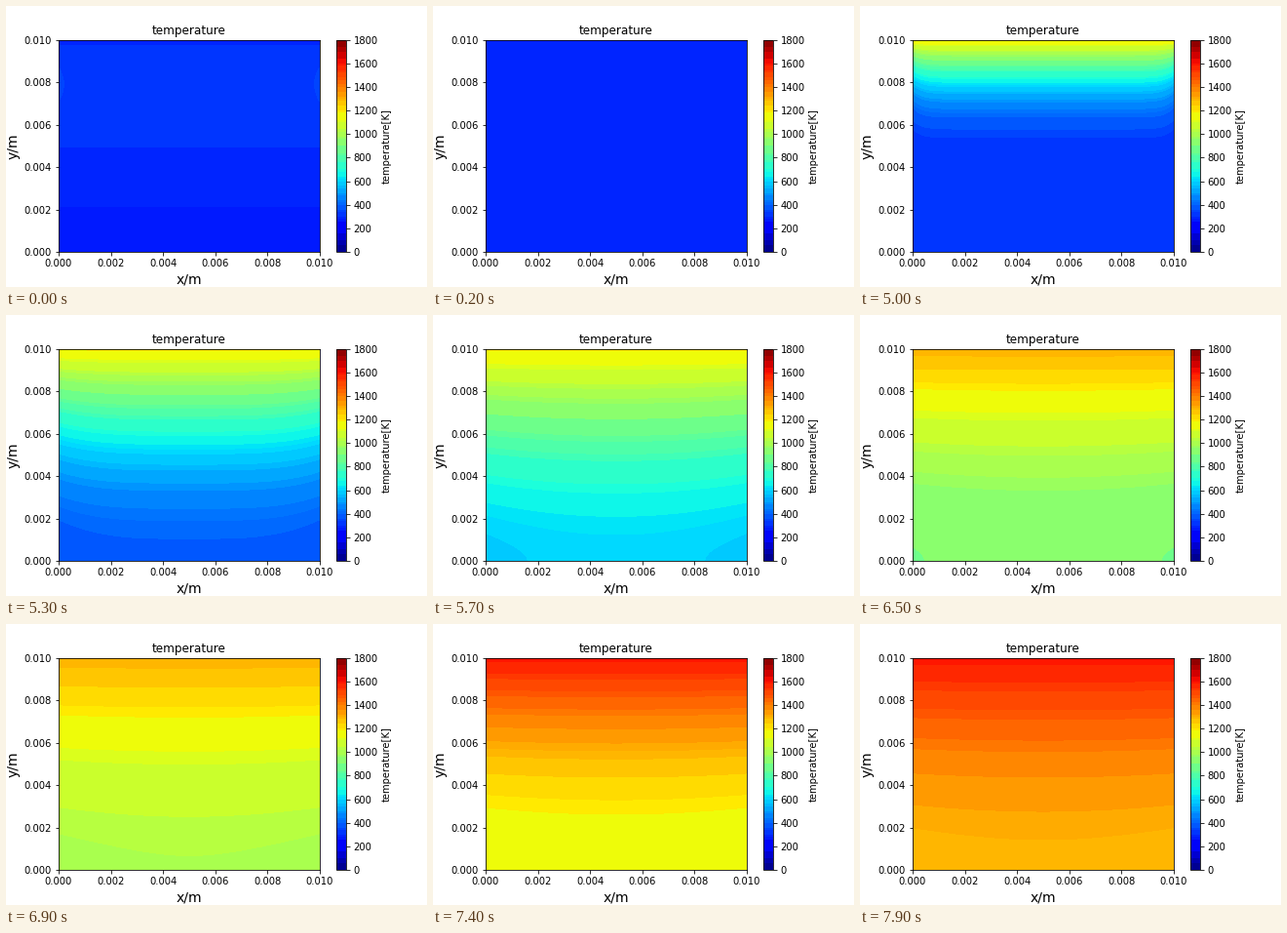
Recreate the animation shown at these times as a matplotlib script. Size 432 by 288 pixels, loop 8 s.

```python
import matplotlib.pyplot as plt
import numpy as np
from matplotlib.animation import FuncAnimation
from matplotlib.cm import ScalarMappable
from matplotlib.colors import ListedColormap, Normalize

FRAMES, INTERVAL = 80, 100
HEAT_FRAME = 50
SIZE = 0.01
T_MAX, STEP = 1800, 20

plt.rcParams.update({"font.family": "DejaVu Sans", "figure.subplot.bottom": 0.125})

levels = np.arange(0, T_MAX + 1, STEP)
norm = Normalize(0, T_MAX)
x = np.linspace(0, 1, 81)
z = np.linspace(0, 1, 51)
edge = np.abs(2 * x - 1)


def reduced_jet():
    """Jet sampled per level, with near-equal neighbours averaged together."""
    rgb = plt.get_cmap("jet")((levels[:-1] + STEP / 2) / T_MAX)[:, :3]
    keys = (rgb * 255).astype(int) // np.array([32, 16, 32])
    return ListedColormap([rgb[(keys == k).all(axis=1)].mean(axis=0) for k in keys])


def top_temperature(t):
    return 1190 if t < 6.05 else 1302 if t < 7.0 else 1595


def heat_profiles(alpha=0.35, loss=0.015, start=4.925, dt=5e-4):
    """Vertical diffusion from the heated top wall; insulated bottom."""
    temp = np.full(z.size, 301.0)
    rate = alpha * dt / (z[1] - z[0]) ** 2
    first, every = round((5 - start) / dt), round(INTERVAL / 1000 / dt)
    profiles = []
    n = 0
    while len(profiles) < FRAMES - HEAT_FRAME:
        temp[-1] = top_temperature(start + n * dt)
        if n >= first and (n - first) % every == 0:
            profiles.append(temp.copy())
        below = np.concatenate([temp[1:2], temp[:-2]])
        inner = temp[:-1]
        temp[:-1] = inner + rate * (below - 2 * inner + temp[1:]) - loss * dt * (inner - 301)
        n += 1
    return profiles


def residual_field():
    base = np.interp(z, [0, 0.217, 0.498, 0.7, 0.88, 0.968, 1],
                     [272, 280, 300, 332, 332, 300, 293])
    wall = np.exp(-(1 - edge) / 2 / 0.017)
    spot = 24 * np.exp(-((z - 0.79) / 0.075) ** 2)
    return base[:, None] + spot[:, None] * wall


def field(i):
    if i < 2:
        return residual_field()
    if i < HEAT_FRAME:
        return np.full((z.size, x.size), 290.0)
    profile = profiles[i - HEAT_FRAME]
    age = (i - HEAT_FRAME) * INTERVAL / 1000
    # Side walls run cooler: a thin layer that spreads and fades.
    part = np.clip((profile - 301) / (profile[-1] - 301), 0, 1)
    drop = (10 + 75 * np.exp(-age / 0.4)) * 4 * part * (1 - part)
    spread = edge ** (2 + 12 * np.exp(-age / 0.15))
    return profile[:, None] - drop[:, None] * spread


profiles = heat_profiles()
cmap = reduced_jet()

fig, ax = plt.subplots(figsize=(6, 4), dpi=72)
bar = fig.colorbar(ScalarMappable(norm, cmap), ax=ax, ticks=np.arange(0, T_MAX + 1, 200))
bar.set_label("temperature[K]")
ax.set_title("temperature")
ax.set_xlabel("x/m", fontsize=14)
ax.set_ylabel("y/m", fontsize=14)
ax.set_xlim(0, SIZE)
ax.set_ylim(0, SIZE)
shown = []


def draw(i):
    while shown:
        shown.pop().remove()
    shown.append(ax.contourf(x * SIZE, z * SIZE, field(i), levels, cmap=cmap, norm=norm))
    return shown


anim = FuncAnimation(fig, draw, frames=FRAMES, interval=INTERVAL,
                     init_func=lambda: draw(0), repeat=True, repeat_delay=0)
plt.show()
```
